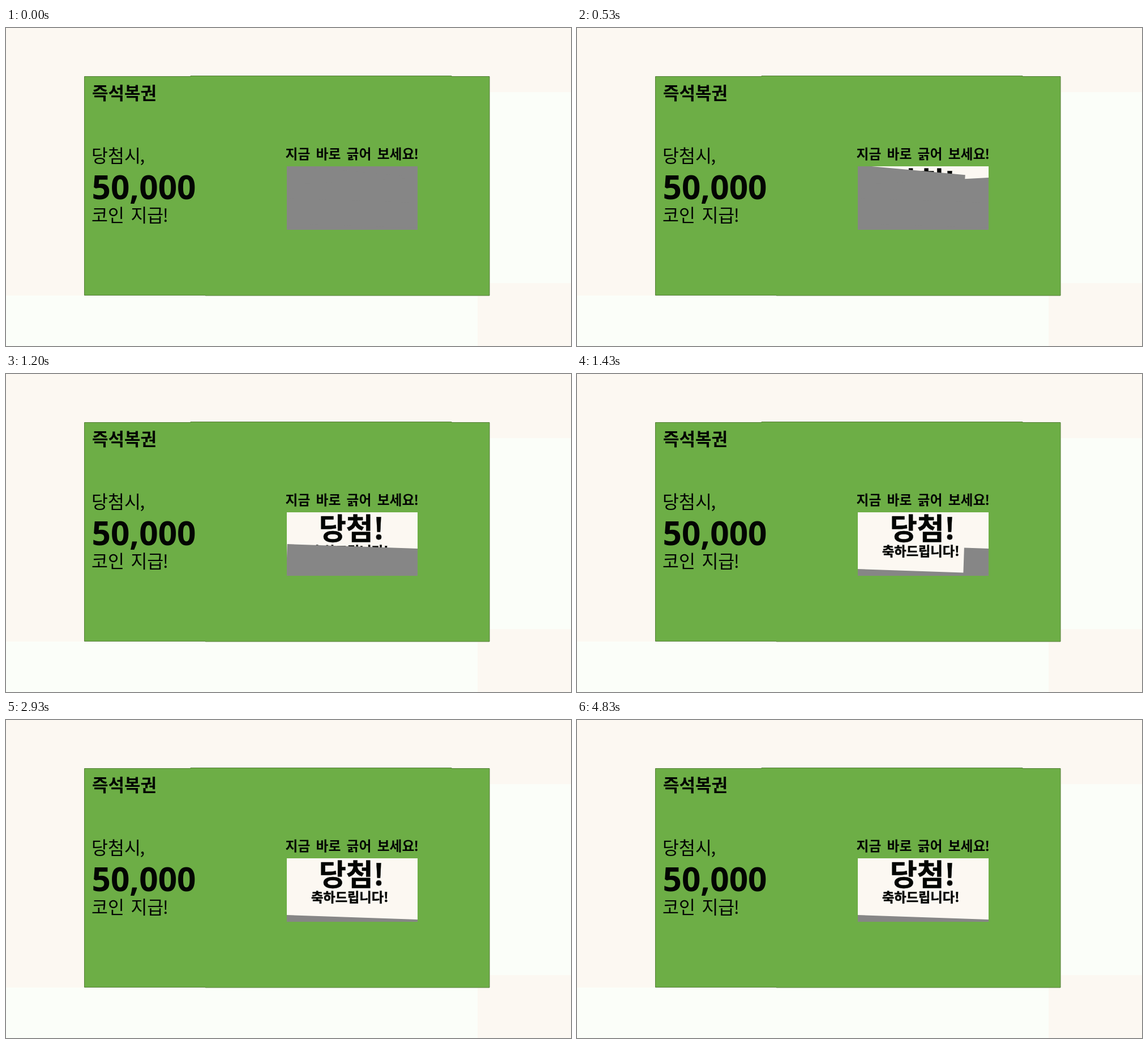
Write an HTML page that moves like this. It is 998x561 px and loops after 4910 ms.

```html
<!DOCTYPE html>
<html lang="ko">
<head>
<meta charset="utf-8">
<title>즉석복권</title>
<style>
html, body { margin: 0; width: 100%; height: 100%; overflow: hidden; background: #fcf8f2; }
svg { display: block; width: 100vw; height: 100vh; }
text { font-family: "Noto Sans CJK KR", "Noto Sans CJK", "Noto Sans CJK JP", sans-serif; fill: #030503; }
.bold { font-weight: 700; }
.thin { font-weight: 300; font-size: 31.5px; word-spacing: 2.6px; }
.prize { font: 700 58.5px "Open Sans", "Noto Sans", sans-serif; }
.win { font-weight: 900; stroke: #030503; stroke-width: .5px; }
</style>
</head>
<body>
<svg viewBox="0 0 998 561">
  <defs>
    <clipPath id="panel"><rect x="496" y="244" width="231" height="112"/></clipPath>
  </defs>
  <rect width="998" height="561" fill="#fcf8f2"/>
  <path d="M855 113H998V450H855ZM0 472H833V561H0Z" fill="#fbfef9"/>
  <path d="M138.5 85.5H326V84.5H787V85.5H854V472H352V471.5H138.5Z" fill="#6dae46" stroke="#557f38"/>
  <text class="bold" x="152" y="125.5" font-size="31">즉석복권</text>
  <text class="thin" x="151" y="237">당첨시<tspan dx="-1.5">,</tspan></text>
  <text class="prize" x="151.5" y="302">50,000</text>
  <text class="thin" x="151" y="342">코인 지급<tspan dx="-1.5">!</tspan></text>
  <text class="bold" x="493.5" y="231" font-size="23.8" word-spacing="3.6">지금 바로 긁어 보세요<tspan dx="-1">!</tspan></text>
  <rect x="496" y="244" width="231" height="112" fill="#fcf8f2"/>
  <text class="win" x="553" y="292" font-size="52">당첨!</text>
  <text class="win" x="539" y="321" font-size="23.2">축하드립니다!</text>
  <g id="foil" clip-path="url(#panel)" fill="#868686">
    <path d="M496 344L727 352V357H496Z"/>
  </g>
</svg>
<script>
const LOOP = 4910, LEFT = 496, RIGHT = 727, WIDTH = RIGHT - LEFT;

// Slanted borders between scratch strokes: y at the left and right side.
const lines = [[244, 244], [241.8, 263], [276, 264], [300, 308], [344, 352]];

// dir 1 scratches rightwards, -1 leftwards.
const strokes = [
  { start: 100, end: 465, dir: 1 },
  { start: 465, end: 835, dir: -1 },
  { start: 835, end: 1200, dir: -1 },
  { start: 1200, end: 1484, dir: 1 }
];

const foil = document.getElementById('foil');
for (const s of strokes) {
  s.el = document.createElementNS('http://www.w3.org/2000/svg', 'polygon');
  foil.append(s.el);
}

const slope = ([a, b]) => (b - a) / WIDTH;
const yAt = (line, x) => line[0] + slope(line) * (x - LEFT);

// Foil left on one strip; the moving edge stands square to its top border.
function strip(top, bottom, p, dir) {
  if (p >= 1) return '';
  const fixed = dir > 0 ? RIGHT : LEFT;
  const edge = dir > 0 ? LEFT + p * WIDTH : RIGHT - p * WIDTH;
  const height = yAt(bottom, edge) - yAt(top, edge);
  const foot = p > 0 ? edge - slope(top) * height : edge;
  return [
    [fixed, yAt(top, fixed)],
    [edge, yAt(top, edge)],
    [foot, yAt(bottom, foot) + 1],
    [fixed, yAt(bottom, fixed) + 1]
  ].join(' ');
}

function draw(t) {
  strokes.forEach(({ start, end, dir, el }, i) => {
    const p = Math.min(1, Math.max(0, (t - start) / (end - start)));
    el.setAttribute('points', strip(lines[i], lines[i + 1], p, dir));
  });
}

const begin = performance.now();
function tick() {
  draw((performance.now() - begin) % LOOP);
  requestAnimationFrame(tick);
}
tick();
</script>
</body>
</html>
```
